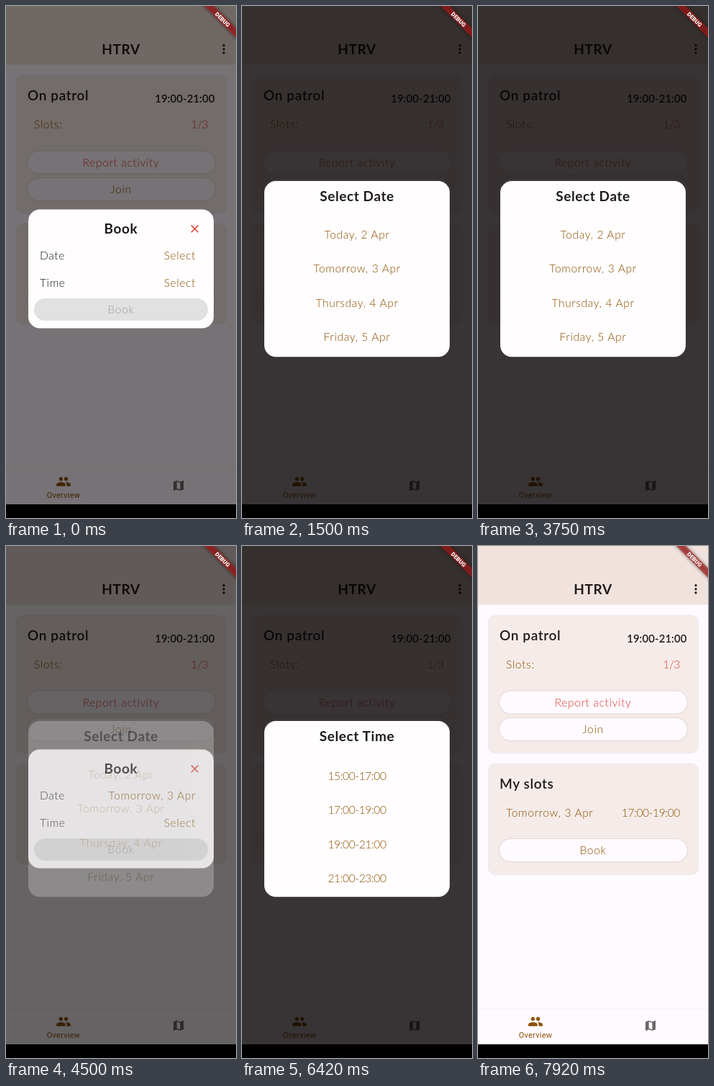
Animation, 320 px wide and 711 px high, one loop 8000 ms. Source, as an HTML page:

```html
<!DOCTYPE html>
<html lang="en">
<head>
<meta charset="utf-8">
<title>Patrol booking</title>
<style>
  html, body { margin: 0; width: 100%; height: 100%; overflow: hidden; background: #000; }
  svg { display: block; width: 100vw; height: 100vh; }
  text { font: 300 15.6px Lato, "Open Sans", sans-serif; letter-spacing: .6px; fill: #1f1b1c; }
  .head { font-size: 19px; font-weight: 700; letter-spacing: .6px; }
  .card { font-weight: 600; }
  .span { font-size: 14.8px; font-weight: 600; letter-spacing: .15px; }
  .num { letter-spacing: -.4px; }
  .brown { fill: #8b5000; }
  .red { fill: #dc3f35; }
  .off { fill: #a09e9f; }
  .nav { font: 400 10.9px Roboto, sans-serif; letter-spacing: .3px; }
  .debug { font: 900 7.9px Roboto, sans-serif; letter-spacing: 0; fill: #fff; }
  .raised { filter: drop-shadow(0 .8px .8px rgba(0, 0, 0, .2)); }
</style>
</head>
<body>
<svg id="stage" viewBox="0 0 320 711" preserveAspectRatio="none"></svg>
<script>
const LOOP = 8000, FPS = 12, ROW = 47.5;
const PEOPLE = 'M16 11c1.66 0 2.99-1.34 2.99-3S17.66 5 16 5c-1.66 0-3 1.34-3 3s1.34 3 3 3zm-8 0c1.66 0 2.99-1.34 2.99-3S9.66 5 8 5C6.34 5 5 6.34 5 8s1.34 3 3 3zm0 2c-2.33 0-7 1.17-7 3.5V19h14v-2.5c0-2.33-4.67-3.5-7-3.5zm8 0c-.29 0-.62.02-.97.05 1.16.84 1.97 1.97 1.97 3.45V19h6v-2.5c0-2.33-4.67-3.5-7-3.5z';
const MAP = 'M20.5 3l-.16.03L15 5.1 9 3 3.36 4.9c-.21.07-.36.25-.36.48V20.5c0 .28.22.5.5.5l.16-.03L9 18.9l6 2.1 5.64-1.9c.21-.07.36-.25.36-.48V3.5c0-.28-.22-.5-.5-.5zM15 19l-6-2.11V5l6 2.11V19z';

const days = ['Today, 2 Apr', 'Tomorrow, 3 Apr', 'Thursday, 4 Apr', 'Friday, 5 Apr',
  'Saturday, 6 Apr', 'Sunday, 7 Apr', 'Monday, 8 Apr'];
const hour = h => String(h).padStart(2, '0') + ':00';
const times = Array.from({ length: 11 }, (_, i) => hour(2 * i + 1) + '-' + hour(2 * i + 3));

const rect = (x, y, w, h, r, fill, more = '') =>
  `<rect x="${x}" y="${y}" width="${w}" height="${h}" rx="${r}" fill="${fill}" ${more}/>`;
const text = (x, y, str, cls = '', anchor = 'start', id = '') =>
  `<text x="${x}" y="${y}" class="${cls}" text-anchor="${anchor}" id="${id}">${str}</text>`;
const pill = (y, str, cls) =>
  rect(30, y, 261, 31, 15.5, '#fefaff', 'class="raised"') + text(160, y + 21, str, cls, 'middle');
const barrier = id => rect(0, 0, 320, 692, 0, '#040100', `id="${id}"`);
const list = (id, rows, cls) => `<g id="${id}">` +
  rows.map((r, i) => text(160, 322.5 + i * ROW, r, 'brown ' + cls, 'middle')).join('') + '</g>';
const picker = (id, title, rows, cls) => `<g id="${id}">` +
  rect(31, 243, 258, 244.3, 16, '#fffdfe') + text(160, 271, title, 'head', 'middle') +
  `<g clip-path="url(#view)">${list(id + 'List', rows, cls)}</g></g>`;

const dots = [54.7, 59.8, 64.9].map(y => `<circle cx="303" cy="${y}" r="1.65" fill="#1f1b1c"/>`).join('');

const base =
  rect(0, 0, 320, 692, 0, '#fefaff') +
  rect(0, 0, 320, 81.5, 0, '#f0e3de') +
  text(160, 66.7, 'HTRV', 'head', 'middle') + dots +
  rect(15, 97, 291, 190, 9, '#f5ece9', 'class="raised"') +
  text(30, 131, 'On patrol', 'head card') +
  text(290.5, 133.6, '19:00-21:00', 'span', 'end') +
  text(39, 169.8, 'Slots:', 'brown') +
  text(281, 169.8, '1/3', 'red num', 'end') +
  pill(201.5, 'Report activity', 'red') + pill(239, 'Join', 'brown') +
  rect(15, 303, 291, 138, 9, '#f5ece9', 'class="raised" id="card"') +
  text(30, 336.5, 'My slots', 'head card') +
  '<g id="slot">' + text(39, 375.5, 'Tomorrow, 3 Apr', 'brown') +
  text(281, 375.5, '17:00-19:00', 'brown num', 'end') + '</g>' +
  `<g id="cardBtn">${pill(407, 'Book', 'brown')}</g>` +
  rect(0, 642.5, 320, 1, 0, '#f7f2f6') +
  `<path d="${PEOPLE}" fill="#8b5000" transform="translate(69.2 649.6) scale(.9)"/>` +
  text(80, 682.8, 'Overview', 'nav brown', 'middle') +
  `<path d="${MAP}" fill="#6c6668" transform="translate(230.7 656.7) scale(.778)"/>`;

const booking = '<g id="book">' + rect(31, 282.5, 258, 165, 16, '#fffdfe') +
  text(160, 316, 'Book', 'head', 'middle') +
  '<path d="M257.8 304.6l9.6 9.6m0-9.6l-9.6 9.6" stroke="#dc3f35" stroke-width="1.5"/>' +
  text(47, 352.3, 'Date') + text(264, 352.3, 'Select', 'brown', 'end', 'date') +
  text(47, 389.6, 'Time') + text(264, 389.6, 'Select', 'brown', 'end', 'time') +
  rect(39, 406, 242, 31, 15.5, '#e2e1e1', 'id="btn"') +
  text(160, 427, 'Book', 'off', 'middle', 'btnText') + '</g>';

const banner = '<g transform="translate(320 0) rotate(45)">' +
  rect(-46, 21.8, 92, 9.3, 0, '#000', 'opacity=".5" filter="url(#blur)"') +
  rect(-46, 21.8, 92, 9.3, 0, '#b71c1c', 'opacity=".63"') +
  text(0, 29.3, 'DEBUG', 'debug', 'middle') + '</g>';

document.getElementById('stage').innerHTML =
  '<defs><clipPath id="view">' + rect(31, 293, 258, 193, 0, '#000') + '</clipPath>' +
  '<filter id="blur" x="-20%" y="-150%" width="140%" height="400%"><feGaussianBlur stdDeviation="2.6"/></filter></defs>' +
  base + barrier('shade1') + booking + barrier('shade2') +
  picker('days', 'Select Date', days, '') + picker('times', 'Select Time', times, 'num') + banner;

const $ = id => document.getElementById(id);
const set = (id, name, value) => $(id).setAttribute(name, value);

// Opacity steps at the picture rate, held in between
const fadeIn = (k, start) => k < start ? 0 : [.3, .72][k - start] ?? 1;
const fadeOut = (k, start) => k < start ? 1 : [.7, .25][k - start] ?? 0;
const glide = (k, start, steps) => {
  const p = Math.min(1, Math.max(0, (k - start + 1) / steps));
  return 1 - (1 - p) ** 2;
};
const reach = rows => (rows.length - 4) * ROW - 2.4;

function choose(id, value, chosen, cls) {
  $(id).textContent = chosen ? value : 'Select';
  set(id, 'class', chosen ? 'brown ' + cls : 'brown');
}

function draw(k) {
  const main = fadeOut(k, 93);
  const day = Math.min(fadeIn(k, 16), fadeOut(k, 53));
  const time = Math.min(fadeIn(k, 62), fadeOut(k, 82));
  set('shade1', 'opacity', .54 * main);
  set('book', 'opacity', main);
  set('shade2', 'opacity', .54 * Math.max(day, time));
  set('days', 'opacity', day);
  set('times', 'opacity', time);

  const dayY = reach(days) * (glide(k, 26, 8) - glide(k, 38, 8));
  const timeY = reach(times) * glide(k, 72, 6);
  set('daysList', 'transform', `translate(0 ${-dayY})`);
  set('timesList', 'transform', `translate(0 ${-timeY})`);

  const ready = k >= 82, booked = k >= 93;
  choose('date', 'Tomorrow, 3 Apr', k >= 53, '');
  choose('time', '17:00-19:00', ready, 'num');
  set('btn', 'fill', ready ? '#f8eeed' : '#e2e1e1');
  set('btn', 'class', ready ? 'raised' : '');
  set('btnText', 'class', ready ? 'brown' : 'off');

  set('card', 'height', booked ? 152.5 : 138);
  set('slot', 'opacity', booked ? 1 : 0);
  set('cardBtn', 'transform', `translate(0 ${booked ? 0 : -14.5})`);
}

let last = -1;
function tick() {
  const k = Math.floor((performance.now() % LOOP + 4) * FPS / 1000) % (LOOP * FPS / 1000);
  if (k !== last) draw(last = k);
  requestAnimationFrame(tick);
}
tick();
</script>
</body>
</html>
```
